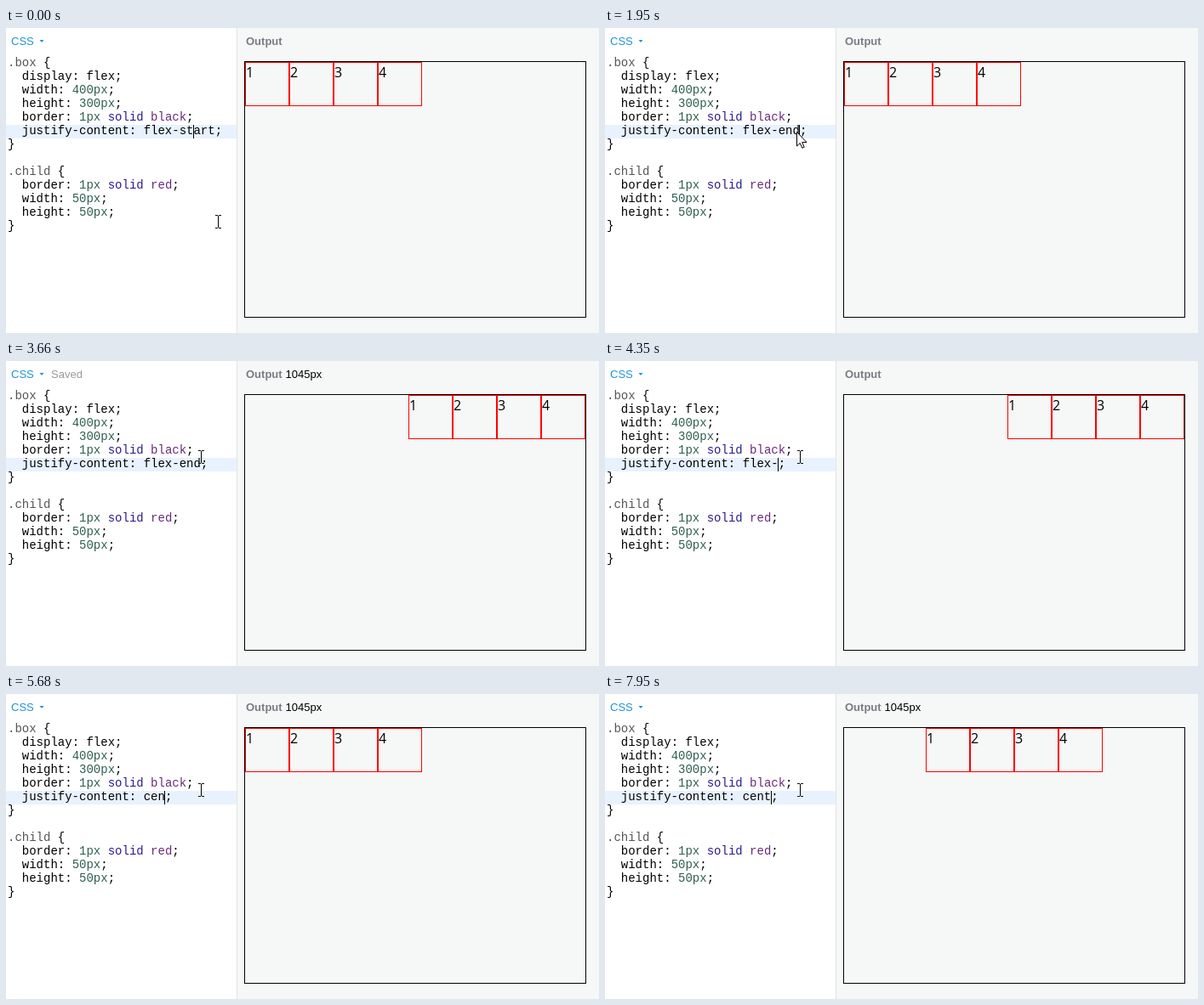
Animation of 697 by 359 pixels, one loop 8 s. Source, as an HTML page:

```html
<!DOCTYPE html>
<html lang="en">
<head>
<meta charset="utf-8">
<style>
  html, body { margin: 0; width: 100%; height: 100%; overflow: hidden; background: #fff; }
  svg { display: block; }
  text { white-space: pre; }
  .code { font: 14px "Liberation Mono", "Courier New", monospace; }
  .label { font: 13px "Liberation Sans", Arial, sans-serif; }
  .digit { font: 16px "Open Sans", "Noto Sans", sans-serif; }
  .selector { fill: #555; }
  .number { fill: #2f5f50; }
  .atom { fill: #2a1c90; }
  .keyword { fill: #6a2a7a; }
</style>
</head>
<body>
<svg width="697" height="359" viewBox="0 0 697 359">
  <path fill="#f6f7f7" d="M271 0h426v359h-426z"/>
  <path fill="#e3e4e5" d="M271 0h1v359h-1z"/>

  <g class="label">
    <text x="6" y="20" fill="#1d94d8">CSS</text>
    <path d="M39.5 14h5l-2.5 3z" fill="#1d94d8"/>
    <text id="saved" x="53" y="20" fill="#999">Saved</text>
    <text x="282" y="20" fill="#7b7b84" font-weight="bold">Output</text>
    <text id="size" x="328.5" y="20">1045px</text>
  </g>

  <rect id="activeLine" y="114" width="271" height="16" fill="#e8f2ff"/>
  <rect id="selection" x="203" y="114" width="42" height="16" fill="#d7d4f0"/>
  <g id="code" class="code"></g>
  <rect id="caret" y="114" width="1" height="16"/>

  <rect x="280.5" y="39.5" width="401" height="301" fill="none" stroke="#000"/>
  <g id="children" class="digit"></g>

  <g id="pointer">
    <path id="beam" fill="none" stroke="#000"
      d="M-3 -7.5H0M1 -7.5H4M.5 -7V7M-3 7.5H0M1 7.5H4"/>
    <path id="arrow" fill="#fff" stroke="#000"
      d="M-.5 -.5V16L3.3 12.5 5.8 18.3 8.2 17.3 5.7 11.5H11Z"/>
  </g>
</svg>
<script>
const $ = id => document.getElementById(id);
const DURATION = 8000, BLINK = 530, CHAR = 8.4, CODE_X = 2, VALUE_COL = 19;
const CHILD = 52, BOX_LEFT = 281, FREE_SPACE = 400 - 4 * CHILD;

const source = `.box {
  display: flex;
  width: 400px;
  height: 300px;
  border: 1px solid black;
  justify-content: flex-start;
}

.child {
  border: 1px solid red;
  width: 50px;
  height: 50px;
}`;

const tokenOf = word =>
  word[0] === '.' ? 'selector' :
  /^\d+px$/.test(word) ? 'number' :
  /^(solid|center)$/.test(word) ? 'atom' :
  /^(black|red)$/.test(word) ? 'keyword' : 'plain';

const colorize = line => line.replace(/\.?[\w-]+/g, word =>
  `<tspan class="${tokenOf(word)}">${word}</tspan>`);

$('code').innerHTML = source.split('\n').map((line, i) =>
  `<text x="${CODE_X}" y="${45 + 16 * i}">${colorize(line)}</text>`).join('');
const valueLine = $('code').children[5];

$('children').innerHTML = [1, 2, 3, 4].map((n, i) =>
  `<g transform="translate(${CHILD * i})">
     <rect x=".5" y="40.5" width="51" height="51" fill="none" stroke="red"/>
     <text x="1" y="58">${n}</text>
   </g>`).join('');

// Successive values while typing or erasing, one per key press.
const typing = (base, word) => [...word].map((_, i) => base + word.slice(0, i + 1));
const erasing = (word, count) => typing('', word + ' ').reverse().slice(2, 2 + count)
  .concat(count === word.length ? '' : []);

// Each edit starts at a time, has one key per gap, and is then rendered
// with a share of the free space to the left of the children.
const edits = [
  { start: -120, gap: 1, values: ['flex-start'], render: -Infinity, share: 0 },
  { start: 1490, gap: 155, values: typing('flex-', 'end'), render: 2030, share: 1 },
  { start: 4060, gap: 131, values: erasing('flex-end', 8), render: 5050, share: 0 },
  { start: 5220, gap: 186, values: typing('', 'center'), render: 6460, share: .5 },
  { start: 7870, gap: 80, values: erasing('center', 2), render: Infinity },
];
const reloads = [2030, 5050, 5300, 5530];

const ramp = (t, from, to) => Math.min(1, Math.max(0, (t - from) / (to - from)));
const fade = (t, from) => ramp(t, from, from + 170);
const ease = (t, from, to) => {
  const p = ramp(t, from, to);
  return p * p * (3 - 2 * p);
};

const show = (id, visible) => $(id).setAttribute('opacity', +visible);
const move = (id, x, y = 0) =>
  $(id).setAttribute('transform', `translate(${Math.round(x)} ${Math.round(y)})`);

let shownValue;
function drawEditor(t) {
  const { start, gap, values } = edits.findLast(edit => edit.start <= t);
  const key = Math.min(values.length - 1, Math.floor((t - start) / gap));
  const value = values[key];
  if (value !== shownValue) {
    valueLine.innerHTML = colorize(`  justify-content: ${value};`);
    shownValue = value;
  }

  const selecting = t >= 940 && t < edits[1].start;
  show('selection', selecting);
  show('activeLine', !selecting);

  const column = VALUE_COL + (value === 'flex-start' ? 'flex-st' : value).length;
  const sinceKey = t - start - key * gap;
  move('caret', Math.floor(CODE_X + CHAR * column));
  show('caret', !selecting && Math.floor(sinceKey / BLINK) % 2 === 0);
  show('saved', fade(t, 2600) - fade(t, 3850) + fade(t, 5950) - fade(t, 7740));
}

function drawOutput(t) {
  const { render, share } = edits.findLast(edit => edit.render <= t);
  move('children', BOX_LEFT + FREE_SPACE * share);
  show('size', render > 0 ? 1 - fade(t, render + 2030) : 0);
}

function drawPointer(t) {
  const approach = ease(t, 70, 720);
  move('pointer',
    249 - 23 * approach + 3 * ease(t, 3080, 3190),
    228 - 105 * approach - 10 * ease(t, 3540, 3660));
  const loading = reloads.some(time => t >= time - 80 && t < time);
  show('arrow', loading);
  show('beam', !loading);
}

function tick() {
  const t = performance.now() % DURATION;
  drawEditor(t);
  drawOutput(t);
  drawPointer(t);
  requestAnimationFrame(tick);
}
tick();
</script>
</body>
</html>
```
